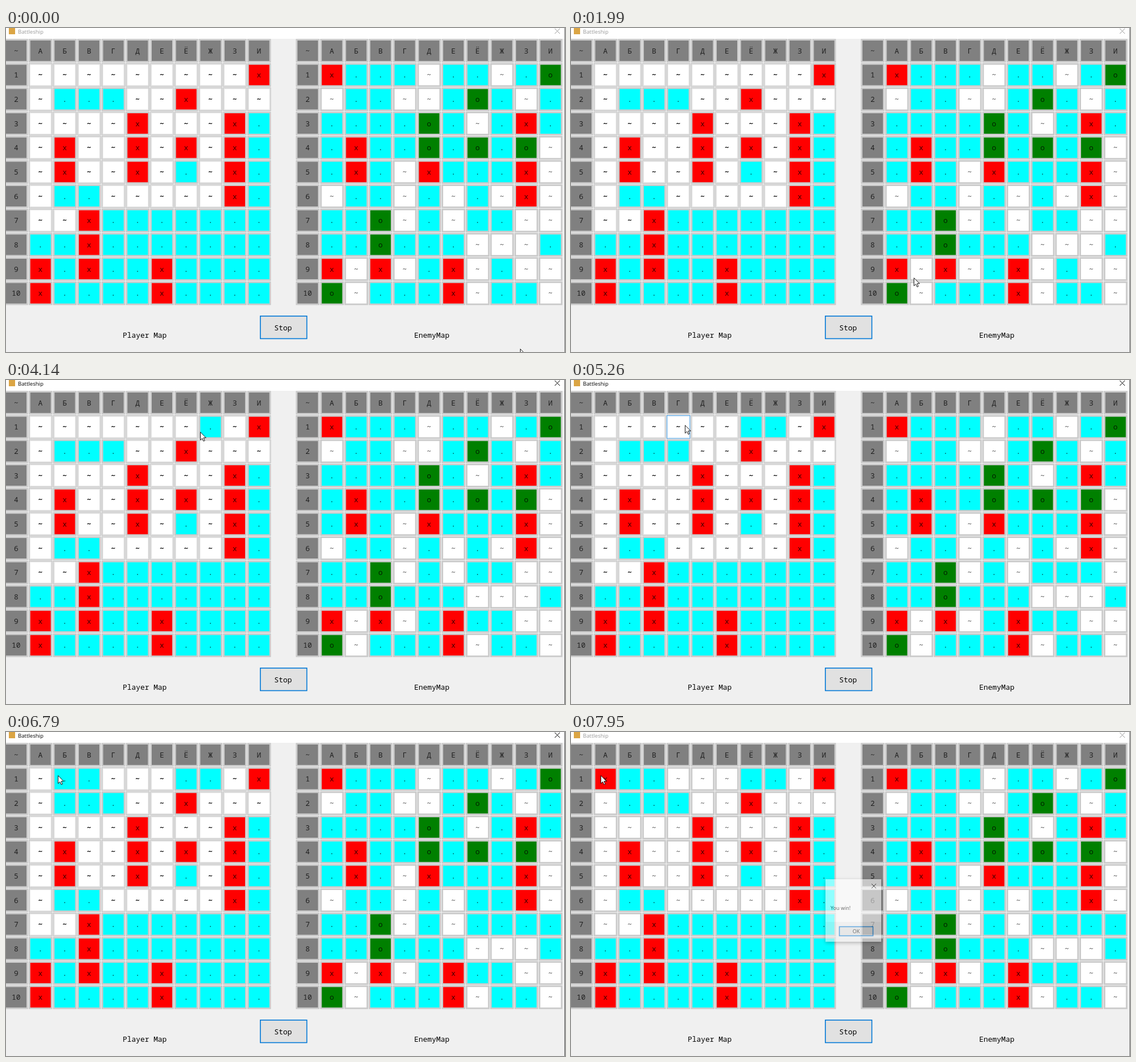
Recreate the animation shown at these times as an HTML page. Size 982 px wide and 570 px high, loop 7990 ms.

```html
<!DOCTYPE html>
<html lang="en">
<head>
<meta charset="utf-8">
<title>Battleship</title>
<style>
html, body { margin: 0; width: 100%; height: 100%; overflow: hidden; background: #f0f0f0; }
#stage { position: absolute; left: 0; top: 0; font: 12.9px "Noto Sans Mono", "DejaVu Sans Mono", monospace; }
.mid { text-anchor: middle; }
.ui { font-family: "Open Sans", sans-serif; }
.cross { fill: none; stroke: #000; }
.idle .title { fill: #999; }
.idle .cross { stroke: #999; }
#edge { fill: #5c5c5c; }
.idle #edge { fill: #808080; }

.cell { --line: #bfbfbf; --ring: #ccc; }
.cell .line { fill: var(--line); }
.cell .ring { fill: var(--ring); }
.cell text { fill: rgba(0, 0, 0, .75); }
.head .face { fill: #808080; }
.free .face { fill: #fff; }
.miss .face { fill: #0ff; }
.hit .face { fill: #f00; }
.ship .face { fill: #008000; }
.on { --line: #adadad; --ring: #e1e1e1; }
.on text { fill: #000; stroke: #000; stroke-width: .35; }
.hot { --line: #0078d7; --ring: #e5f1fb; }
.down { --line: #005499; --ring: #cce4f7; }

.button { fill: #e1e1e1; stroke: #0078d7; stroke-width: 1.6; }
.button.plain { stroke: #adadad; stroke-width: .7; }
#dialog { filter: drop-shadow(0 2px 3px rgba(0, 0, 0, .45)); }
</style>
</head>
<body>
<svg id="stage" width="982" height="570">
  <rect width="982" height="570" fill="#f0f0f0"/>
  <rect width="982" height="19" fill="#fff"/>
  <rect x="5" width="11" height="11" fill="#dba544"/>
  <text class="ui title" x="21" y="9.5" font-size="9.6">Battleship</text>
  <path class="cross" d="M964 1l9 9m0-9l-9 9"/>
  <g id="boards"></g>
  <rect id="stop" class="button" x="446.8" y="506.8" width="81.7" height="39.7"/>
  <text class="mid" x="486.7" y="531.5">Stop</text>
  <text x="205" y="544.5">Player Map</text>
  <text x="717" y="544.5">EnemyMap</text>
  <rect id="edge" x="981" width="1" height="570"/>
  <g id="dialog" class="ui" font-size="9">
    <rect x="447" y="259" width="98" height="110" fill="#f0f0f0"/>
    <rect x="447" y="259" width="98" height="75" fill="#fff"/>
    <path d="M528 267l8 8m0-8l-8 8" stroke="#000"/>
    <text x="456" y="313">You win!</text>
    <rect class="button" x="471.5" y="342.5" width="59" height="16"/>
    <text class="mid" x="501" y="354">OK</text>
  </g>
  <path id="cursor" d="M.5 .7V14.6L3.8 11.6L6 16.6L8.2 15.6L6 10.7H10.3Z" fill="#fff" stroke="#000" stroke-width=".9"/>
</svg>
<script>
const LOOP = 7990, TOP = 62, PITCH = 128 / 3, SIZE = 124 / 3, LINE = 2 / 3, RING = 8 / 3;
const LETTERS = "АБВГДЕЁЖЗИ";
const KIND = { "~": "free", ".": "miss", x: "hit", o: "ship" };
const PLAYER = `~~~~~~~~~x ~...~~x~~~ ~~~~x~~~x. ~x~~x~x~x. ~x~~x~.~x.
  ~..~~~~~x. ~~x....... ..x....... x.x..x.... x....x....`.split(/\s+/);
const ENEMY = `x...~..~.o ~..~~.o.~. ....o.~.x. .x..o.o.o~ .x.~x...x~
  ~..~.~.~x~ ..o~.~..~~ ..o...~~~. x~x~.x~.~~ o~...x~..~`.split(/\s+/);

// each click: time, cell, and the cell hit in return
const HOLD = 170, FLASH = 50, OVER = 7830;
const SHOTS = [
  [3800, "Ж1", "Ё9"], [4420, "Ё1", "З7"], [5880, "В1", "Ж6"], [6450, "Б1", "И7"], [7540, "А1"]
].map(([press, aim, reply]) => ({ press, release: press + HOLD, aim, reply }));

// pointer tip: time, x, y
const PATH = [
  [0, 903, 564], [790, 640, 451], [1560, 634, 450], [1990, 602, 439], [2360, 546, 418],
  [3190, 362, 303], [3370, 384, 176], [3800, 349, 91], [4140, 341, 91], [5260, 200, 79],
  [5880, 139, 78], [6790, 91, 76], [7800, 52, 76], [LOOP, 52, 76]
];

const $ = id => document.getElementById(id);
const stage = $("stage"), boards = $("boards"), cursor = $("cursor");

function add(parent, tag, attrs) {
  const el = document.createElementNS("http://www.w3.org/2000/svg", tag);
  for (const name in attrs) el.setAttribute(name, attrs[name]);
  return parent.appendChild(el);
}

function addCell(left, col, row, kind, label) {
  const x = left + col * PITCH, y = TOP + row * PITCH;
  const el = add(boards, "g", { class: "cell " + kind, transform: `translate(${x} ${y})` });
  const layer = (name, inset) => add(el, "rect",
    { class: name, x: inset, y: inset, width: SIZE - 2 * inset, height: SIZE - 2 * inset });
  layer("line", 0);
  layer("ring", LINE);
  layer("face", RING);
  const text = add(el, "text", { class: "mid", x: SIZE / 2 - .2, y: SIZE / 2 + 4.7 });
  text.textContent = label;
  return { x, y, el, text, mark: label, name: LETTERS[col] + (row + 1) };
}

function addBoard(left, rows) {
  for (let i = -1; i < 10; i++) {
    addCell(left, i, -1, "head", LETTERS[i] || "~");
    if (i >= 0) addCell(left, -1, i, "head", i + 1);
  }
  return rows.flatMap((line, row) =>
    [...line].map((mark, col) => addCell(left, col, row, KIND[mark], mark)));
}

const player = addBoard(40, PLAYER), enemy = addBoard(552, ENEMY);

function paint(cell, mark, state = "") {
  const cls = `cell ${KIND[mark]} ${state}`;
  if (cell.el.getAttribute("class") !== cls) cell.el.setAttribute("class", cls);
  if (cell.text.textContent !== mark) cell.text.textContent = mark;
}

// smooth curve through the path that never overshoots a point
function along(t, axis) {
  const i = Math.max(1, PATH.findIndex(p => p[0] >= t));
  const slope = n => {
    const k = Math.min(Math.max(n, 1), PATH.length - 1);
    return (PATH[k][axis] - PATH[k - 1][axis]) / (PATH[k][0] - PATH[k - 1][0]);
  };
  const tangent = n => {
    const a = slope(n), b = slope(n + 1);
    return a * b > 0 ? 2 * a * b / (a + b) : 0;
  };
  const p = PATH[i - 1], q = PATH[i], span = q[0] - p[0], k = (t - p[0]) / span, r = 1 - k;
  return Math.round(p[axis] * r * r * (1 + 2 * k) + q[axis] * k * k * (3 - 2 * k)
    + span * k * r * (tangent(i - 1) * r - tangent(i) * k));
}

function render(t) {
  const mx = along(t, 1), my = along(t, 2);
  const pressed = SHOTS.find(s => t >= s.press && t < s.release);
  const locked = t >= OVER || SHOTS.some(s => t >= s.release && t < s.release + FLASH);
  const over = c => mx >= c.x && mx < c.x + SIZE && my >= c.y && my < c.y + SIZE;

  for (const cell of player) {
    const shot = SHOTS.find(s => s.aim === cell.name);
    const mark = shot && t >= shot.release ? (shot.reply ? "." : "x") : cell.mark;
    let state = "";
    if (mark === "~" && !locked) {
      state = "on" + (shot && shot === pressed ? " down" : over(cell) ? " hot" : "");
    }
    paint(cell, mark, state);
  }
  for (const cell of enemy) {
    const shot = SHOTS.find(s => s.reply === cell.name);
    paint(cell, shot && t >= shot.release + FLASH ? "." : cell.mark);
  }

  stage.setAttribute("class", t < SHOTS[0].press || t >= OVER ? "idle" : "");
  $("stop").setAttribute("class", pressed ? "button plain" : "button");
  $("dialog").style.opacity = t < 7910 ? 0 : t < 7950 ? .25 : .56;
  cursor.setAttribute("transform", `translate(${mx} ${my})`);
}

const start = performance.now();
function tick() {
  render((performance.now() - start) % LOOP);
  requestAnimationFrame(tick);
}
tick();
</script>
</body>
</html>
```
